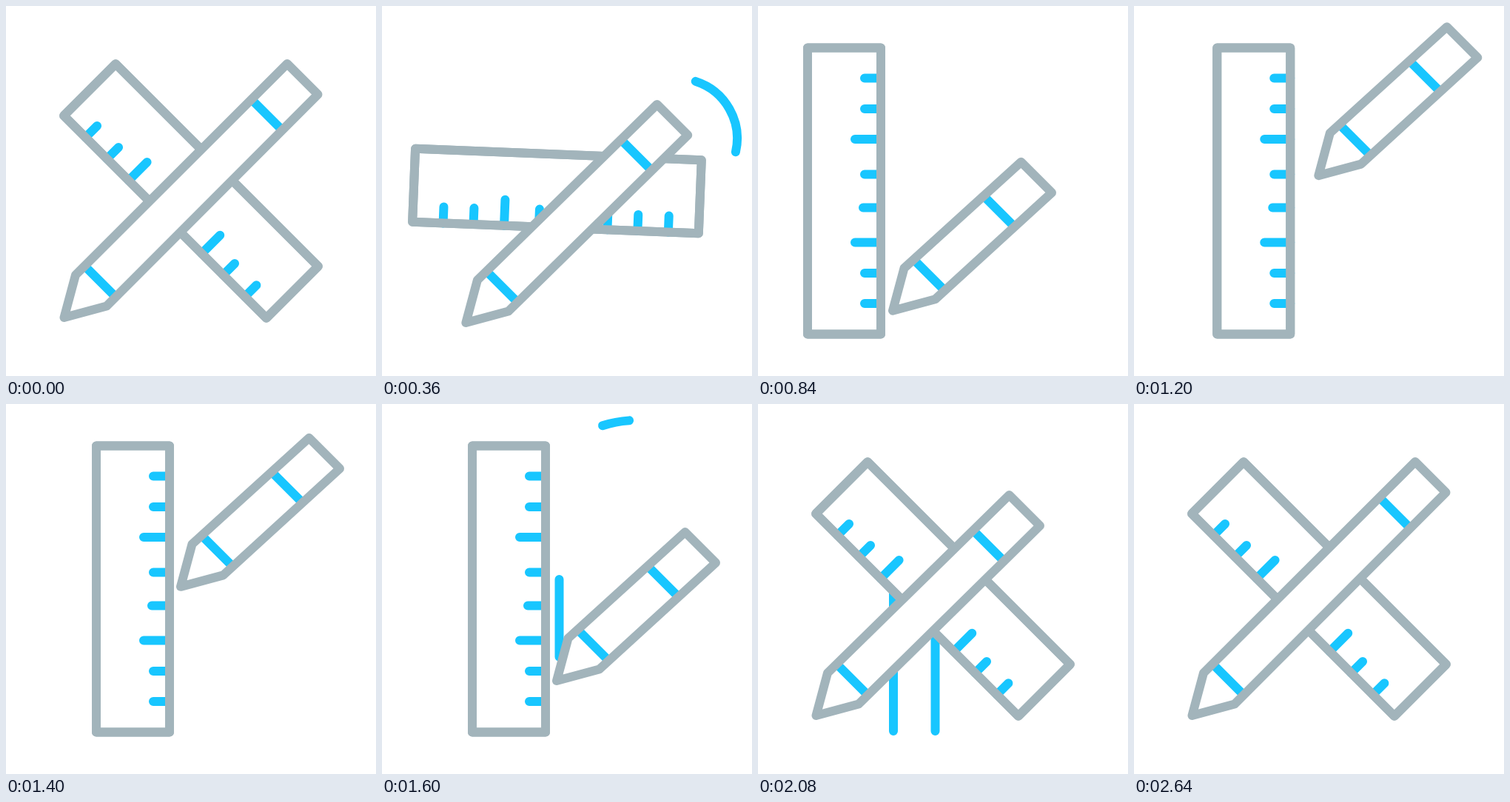
These frames come from a looping animation (500x500 px, 2.88 s). An HTML page:

```html
<!DOCTYPE html>
<html lang="en">
<head>
<meta charset="utf-8">
<title>Ruler and pencil</title>
<style>
  html, body { margin: 0; width: 100%; height: 100%; overflow: hidden; background: #fff; }
  svg { display: block; width: 100%; height: 100%; }
  path { fill: none; stroke-width: 12; stroke-linecap: round; stroke-linejoin: round; }
  .body { fill: #fff; stroke: #a2b4bb; }
  .mark { stroke: #18c6ff; }
  .band { stroke-linecap: butt; }
</style>
</head>
<body>
<svg viewBox="0 0 500 500">
  <path class="mark" id="trails"/>
  <g id="ruler">
    <path class="body" d="M-193.5-49.5h387v99h-387z"/>
    <path class="mark" id="ticks"/>
    <path class="body" style="fill:none" d="M-193.5-49.5h387v99h-387z"/>
  </g>
  <g id="pencil">
    <path class="body" id="fill" style="stroke:none"/>
    <path class="mark band" id="bands"/>
    <path class="body" id="outline" style="fill:none"/>
  </g>
</svg>
<script>
const LOOP = 2880, STEP = 40;
const $ = id => document.getElementById(id);
const set = (id, name, value) => $(id).setAttribute(name, value);

// Eased progress of a move that starts at `start` and lasts `span` ms.
const ease = (t, start, span) => {
  const u = Math.min(1, Math.max(0, (t - start) / span));
  return u * u * (3 - 2 * u);
};
const mix = (a, b, u) => a + (b - a) * u;

const TICKS = [[-152.5, 22], [-111, 22], [-70, 35], [-22.5, 22],
               [22.5, 24], [69.5, 35], [111, 22], [152, 22]];
set('ticks', 'd', TICKS.map(([x, len]) => `M${-x} 49.5v${-len}`).join(''));

// Strokes whose head and tail each run from angle a to angle b (degrees).
const ARCS = [
  { x: 399, y: 179, r: 81, a: 20, b: -95, head: [220, 196], tail: [330, 200] },
  { x: 345, y: 180, r: 158, a: -107.3, b: -40, head: [1540, 210], tail: [1600, 270] },
  { x: 324, y: 227, r: 200, a: -97.5, b: -36.5, head: [2163, 300], tail: [2265, 340] }
];
const LINES = [
  { x: 183, from: 442, to: 237, draw: [845, 280] },
  { x: 239.5, from: 237, to: 442, draw: [1382, 430] }
];

function arcPath(t, { x, y, r, a, b, head, tail }) {
  const h = ease(t, ...head), k = ease(t, ...tail);
  if (h - k < 0.002) return '';
  const at = u => {
    const w = mix(a, b, u) * Math.PI / 180;
    return `${x + r * Math.cos(w)} ${y + r * Math.sin(w)}`;
  };
  return `M${at(k)}A${r} ${r} 0 0 ${b > a ? 1 : 0} ${at(h)}`;
}

function linePath(t, { x, from, to, draw }) {
  const d = ease(t, ...draw);
  const wipe = ease(t, 2070, 240);
  if (d <= 0 || wipe >= 1) return '';
  const end = mix(from, to, d);
  const top = Math.min(from, end), bottom = Math.max(from, end);
  return `M${x} ${mix(top, bottom, wipe)}V${bottom}`;
}

function drawRuler(t) {
  const back = ease(t, 1715, 362);
  const angle = 45 - 135 * (ease(t, 180, 480) - back);
  const x = 250 - 133.5 * ease(t, 284, 385) + 55 * ease(t, 1050, 205) + 78.5 * back;
  set('ruler', 'transform', `translate(${x} 250) rotate(${angle})`);
}

function drawPencil(t) {
  const out = ease(t, 170, 488), home = ease(t, 1760, 300);
  const hop = Math.sin(Math.PI * Math.min(1, Math.max(0, (t - 1090) / 250)));
  const x = 78.5 + 103.5 * out + 54 * ease(t, 1090, 250) + 46 * hop - 157.5 * home;
  const y = 421 + 21 * out - 205 * ease(t, 760, 330) - 8 * hop
          + 205 * ease(t, 1345, 415) - 21 * home;
  set('pencil', 'transform', `translate(${x} ${y})`);

  // The far end slides towards the tip as the body gets shorter.
  const s = out - ease(t, 1880, 320);
  const ex = 301.5 - 128 * s, ey = -343 + 142 * s;
  const d = `M0 0L15.5-57.5L${ex} ${ey}l41.5 41.5L57.5-15.5z`;
  set('fill', 'd', d);
  set('outline', 'd', d);
  set('bands', 'd', `M30-67.5l39 39M${ex - 47} ${ey + 49.5}l38 38`);
}

function render(now) {
  const t = Math.floor(now % LOOP / STEP) * STEP;
  set('trails', 'd', LINES.map(l => linePath(t, l)).join('') + ARCS.map(a => arcPath(t, a)).join(''));
  drawRuler(t);
  drawPencil(t);
}

let origin;
function tick(now) {
  origin ??= now;
  render(now - origin);
  requestAnimationFrame(tick);
}
render(0);
requestAnimationFrame(tick);
</script>
</body>
</html>
```
